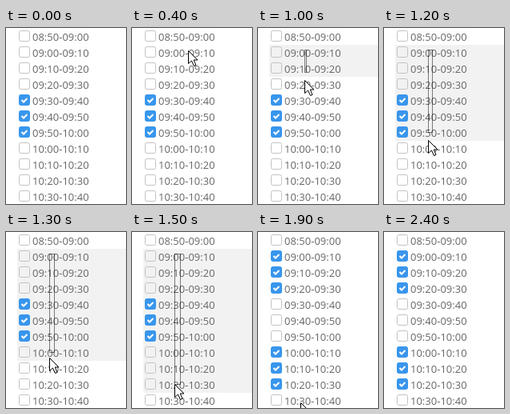
An HTML page with a canvas that plays this animation: 150x220 px, repeating every 2500 ms.

```html
<!DOCTYPE html>
<html>
<head>
<meta charset="utf-8">
<style>
  html, body { margin: 0; height: 100%; overflow: hidden; background: #fff; }
  canvas { display: block; }
</style>
</head>
<body>
<canvas width="150" height="220"></canvas>
<script>
const ctx = document.querySelector('canvas').getContext('2d');
const LOOP = 2500, STEP = 100, ROWS = 11, PITCH = 20;
const PRESS = 900, RELEASE = 1900;
const origin = { x: 60.5, y: 27.5 };

// Pointer tip: [ms, x, y]
const path = [
  [100, 132, 176], [200, 112, 118], [300, 86, 58], [400, 70, 28],
  [600, 63, 26], [800, 62, 26], [900, 60, 28], [1200, 55, 140],
  [1500, 53, 190], [1700, 53, 194], [1800, 53, 194], [1900, 53, 213]
];

function pointerAt(t) {
  if (t < path[0][0] || t > path.at(-1)[0]) return null;
  const i = Math.max(1, path.findIndex(p => p[0] >= t));
  const [t0, x0, y0] = path[i - 1], [t1, x1, y1] = path[i];
  const k = (t - t0) / (t1 - t0);
  return { x: Math.round(x0 + (x1 - x0) * k), y: Math.round(y0 + (y1 - y0) * k) };
}

const clock = minutes =>
  [Math.floor(minutes / 60), minutes % 60].map(n => String(n).padStart(2, '0')).join(':');

function drawRow(i, checked, selected) {
  const y = 4 + i * PITCH;
  if (selected) {
    ctx.fillStyle = '#f2f2f2';
    ctx.fillRect(14, y - 3, 136, PITCH);
  }
  ctx.beginPath();
  ctx.roundRect(16.5, y - 0.5, 13, 13, 2);
  ctx.fillStyle = checked ? '#3896ec' : selected ? '#f2f2f2' : '#fff';
  ctx.strokeStyle = checked ? '#3896ec' : '#c3c3c3';
  ctx.lineWidth = 1;
  ctx.fill();
  ctx.stroke();
  if (checked) {
    ctx.beginPath();
    ctx.moveTo(19.5, y + 6);
    ctx.lineTo(22, y + 8.5);
    ctx.lineTo(26.5, y + 4);
    ctx.strokeStyle = '#fff';
    ctx.lineWidth = 2;
    ctx.stroke();
  }
  const start = 530 + i * 10;
  ctx.fillStyle = '#666';
  ctx.fillText(clock(start) + '-' + clock(start + 10), 33, y + 12);
}

function drawLasso(x, y) {
  ctx.setLineDash([1, 1]);
  ctx.strokeStyle = '#000';
  ctx.lineWidth = 1;
  ctx.strokeRect(x, origin.y, origin.x - x, y - origin.y);
  ctx.setLineDash([]);
}

const arrow = new Path2D('M0 0V16L4 12.5L7 19L9.5 18L6.8 11.5H11.5Z');
function drawPointer({ x, y }) {
  ctx.save();
  ctx.translate(x + 0.5, y + 0.5);
  ctx.fillStyle = '#fff';
  ctx.strokeStyle = '#000';
  ctx.lineWidth = 1;
  ctx.fill(arrow);
  ctx.stroke(arrow);
  ctx.restore();
}

function draw(t) {
  const pointer = pointerAt(t);
  const dragging = t >= PRESS && t < RELEASE;
  const released = t >= RELEASE;
  // The lasso trails the pointer while it moves quickly.
  const lag = t > PRESS && t < 1500 ? Math.min(10, (1500 - t) / 30) : 0;
  const bottom = dragging ? Math.max(origin.y, Math.round(pointer.y - lag) + 0.5) : 0;

  ctx.fillStyle = '#fff';
  ctx.fillRect(0, 0, 150, 220);
  ctx.font = '13px "Open Sans", sans-serif';
  for (let i = 0; i < ROWS; i++) {
    const inDrag = i >= 1 && i <= 9;
    const initial = i >= 4 && i <= 6;
    const selected = dragging && inDrag && 1 + i * PITCH < bottom;
    drawRow(i, released && inDrag ? !initial : initial, selected);
  }
  if (dragging) drawLasso(pointer.x + 0.5, bottom);
  if (pointer) drawPointer(pointer);
}

function tick() {
  draw(Math.floor(performance.now() % LOOP / STEP) * STEP);
  requestAnimationFrame(tick);
}
tick();
</script>
</body>
</html>
```
